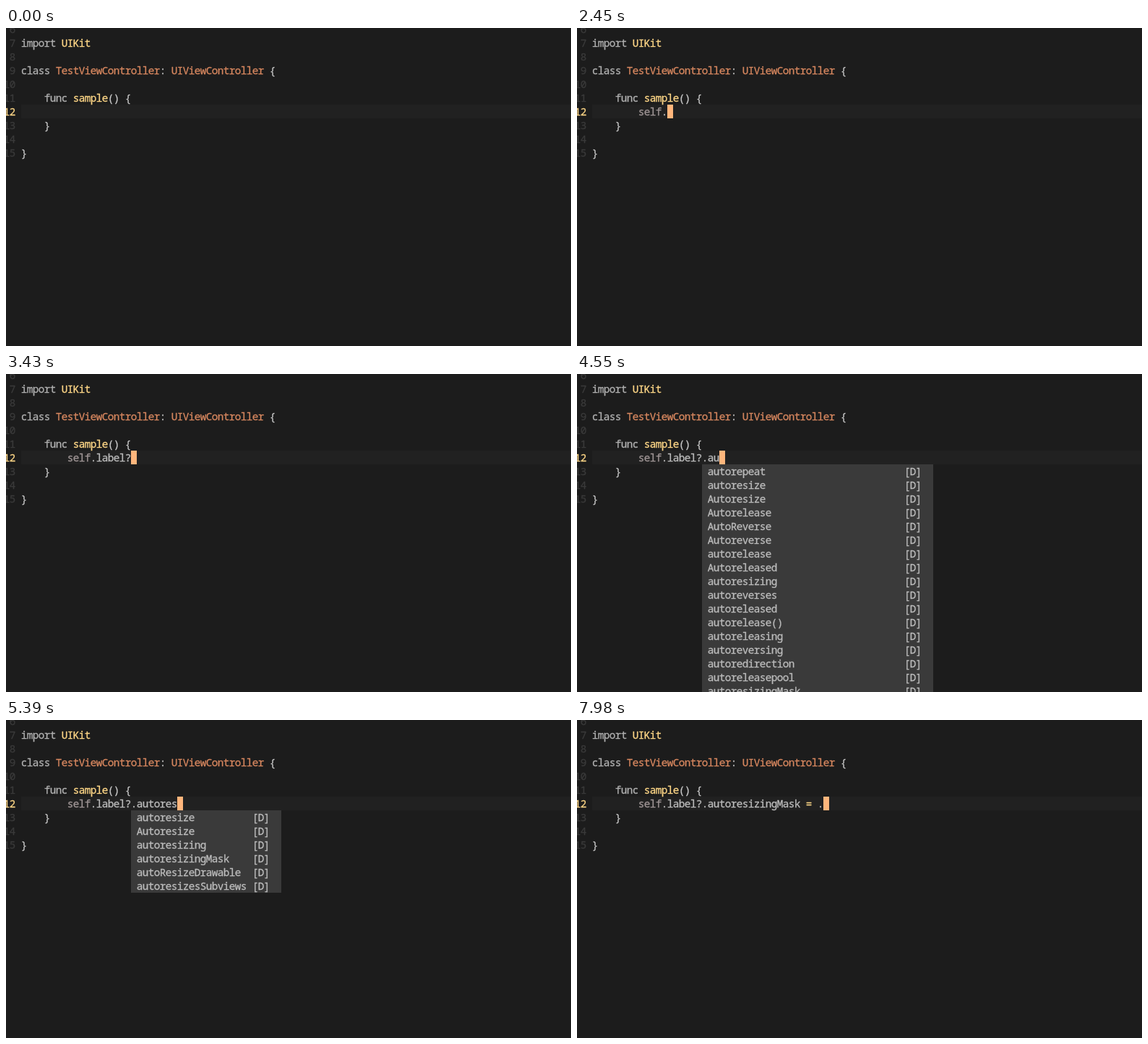
Recreate the animation shown at these times as an HTML page with a canvas. Size 782 by 440 pixels, loop 8 s.

```html
<!DOCTYPE html>
<html lang="en">
<head>
<meta charset="utf-8">
<style>
  html, body { margin: 0; width: 100%; height: 100%; overflow: hidden; background: #1c1c1c; }
  canvas { display: block; }
</style>
</head>
<body>
<canvas id="stage" width="782" height="440"></canvas>
<script>
const ctx = document.getElementById('stage').getContext('2d');
const LOOP = 8000, CELL = 8, LINE = 19, LEFT = 21, EDIT_LINE = 12;
const GREY = '#bcbcbc', KEYWORD = '#b0b0b0', DIM = '#a09696', YELLOW = '#ffd787',
      ORANGE = '#d7875f', CURSOR = '#ffb67c', NUMBER = '#3a3a3a', BRACE = '#c8c8c8';

const code = {
  7: [['import ', KEYWORD], ['UIKit', YELLOW]],
  9: [['class ', KEYWORD], ['TestViewController', ORANGE], [': ', GREY], ['UIViewController', ORANGE], [' {', BRACE]],
  11: [['    func ', KEYWORD], ['sample', YELLOW], ['() {', BRACE]],
  13: [['    }', BRACE]],
  15: [['}', BRACE]]
};

const labelWords = ('label labels Label labeled labelled labelText labelFont labelColor labelWidth labelHeight ' +
  'labelFontSize labelForIndex labelAlignment labelTextColor labelBackground labelConstraint ' +
  'labelDidMoveToSuperviewWithAnimation').split(' ');
const autoWords = ('autorepeat autoresize Autoresize Autorelease AutoReverse Autoreverse autorelease Autoreleased ' +
  'autoresizing autoreverses autoreleased autorelease() autoreleasing autoreversing autoredirection ' +
  'autoreleasepool autoresizingMask autoresizesSubviews autoreverseAnimationsWhenRepeated').split(' ');
const sizeWords = 'autoresize Autoresize autoresizing autoresizingMask autoResizeDrawable autoresizesSubviews'.split(' ');

// Each step: start time, text on the edited line, completion words, selected row.
const label = 'self.label', member = label + '?.';
const steps = [
  [70, 's'], [350, 'se'], [420, 'sel'], [840, 'self'], [1400, 'self.'],
  [2520, 'self.l'], [2590, 'self.la'], [2730, 'self.lab'], [2800, label],
  [3290, label, labelWords], [3430, label + '?'], [3920, member],
  [3990, member + 'a'], [4060, member + 'au'], [4550, member + 'au', autoWords],
  [4620, member + 'aut', autoWords], [4690, member + 'auto', autoWords],
  [4760, member + 'autor', autoWords], [5040, member + 'autore', autoWords],
  [5320, member + 'autores', autoWords], [5390, member + 'autores', sizeWords],
  ...[6160, 6370, 6650, 6860].map((time, i) => [time, member + sizeWords[i], sizeWords, i]),
  [7210, member + 'autoresizingMask '], [7630, member + 'autoresizingMask ='],
  [7910, member + 'autoresizingMask = '], [7980, member + 'autoresizingMask = .']
];

const lineTop = n => 106 + LINE * (n - EDIT_LINE);

function box(x, y, w, h, color) {
  ctx.fillStyle = color;
  ctx.fillRect(x, y, w, h);
}

// Draws text centred in the cells of the grid and returns the x after it.
// The hairline stroke gives the strokes a medium weight.
function write(text, x, top, color) {
  ctx.fillStyle = ctx.strokeStyle = color;
  for (const ch of text) {
    ctx.fillText(ch, x + CELL / 2, top + 15);
    ctx.strokeText(ch, x + CELL / 2, top + 15);
    x += CELL;
  }
  return x;
}

function drawPopup(words, x, selected) {
  const longest = Math.max(...words.map(w => w.length));
  const width = (longest + 7) * CELL;
  words.forEach((word, i) => {
    const top = lineTop(EDIT_LINE + 1 + i), active = i === selected;
    const color = active ? '#303030' : '#bcbcbc';
    box(x, top, width, LINE, active ? '#bcbcbc' : '#3a3a3a');
    write(word, x + CELL, top, color);
    write('[D]', x + (longest + 2) * CELL, top, color);
  });
}

function drawEdit([, text, words, selected]) {
  const top = lineTop(EDIT_LINE), start = LEFT + 8 * CELL;
  let x = start;
  for (const part of text.split(/(^self|=)/)) {
    x = write(part, x, top, part === 'self' ? DIM : part === '=' ? YELLOW : GREY);
  }
  box(x, top, CELL, LINE, CURSOR);
  if (words) drawPopup(words, start + text.lastIndexOf('.') * CELL, selected);
}

function draw(time) {
  box(0, 0, 782, 440, '#1c1c1c');
  box(LEFT, lineTop(EDIT_LINE), 782 - LEFT, LINE, '#212121');
  for (let n = 6; n <= 15; n++) {
    write(String(n).padStart(2), -3, lineTop(n), n === EDIT_LINE ? YELLOW : NUMBER);
    let x = LEFT;
    for (const [text, color] of code[n] || []) x = write(text, x, lineTop(n), color);
  }
  const step = steps.filter(s => s[0] <= time).pop();
  if (step) drawEdit(step);
}

ctx.font = '14.3px "Noto Sans Mono", monospace';
ctx.textAlign = 'center';
ctx.lineWidth = 0.3;
const begin = performance.now();
function tick() {
  draw((performance.now() - begin) % LOOP);
  requestAnimationFrame(tick);
}
tick();
</script>
</body>
</html>
```
